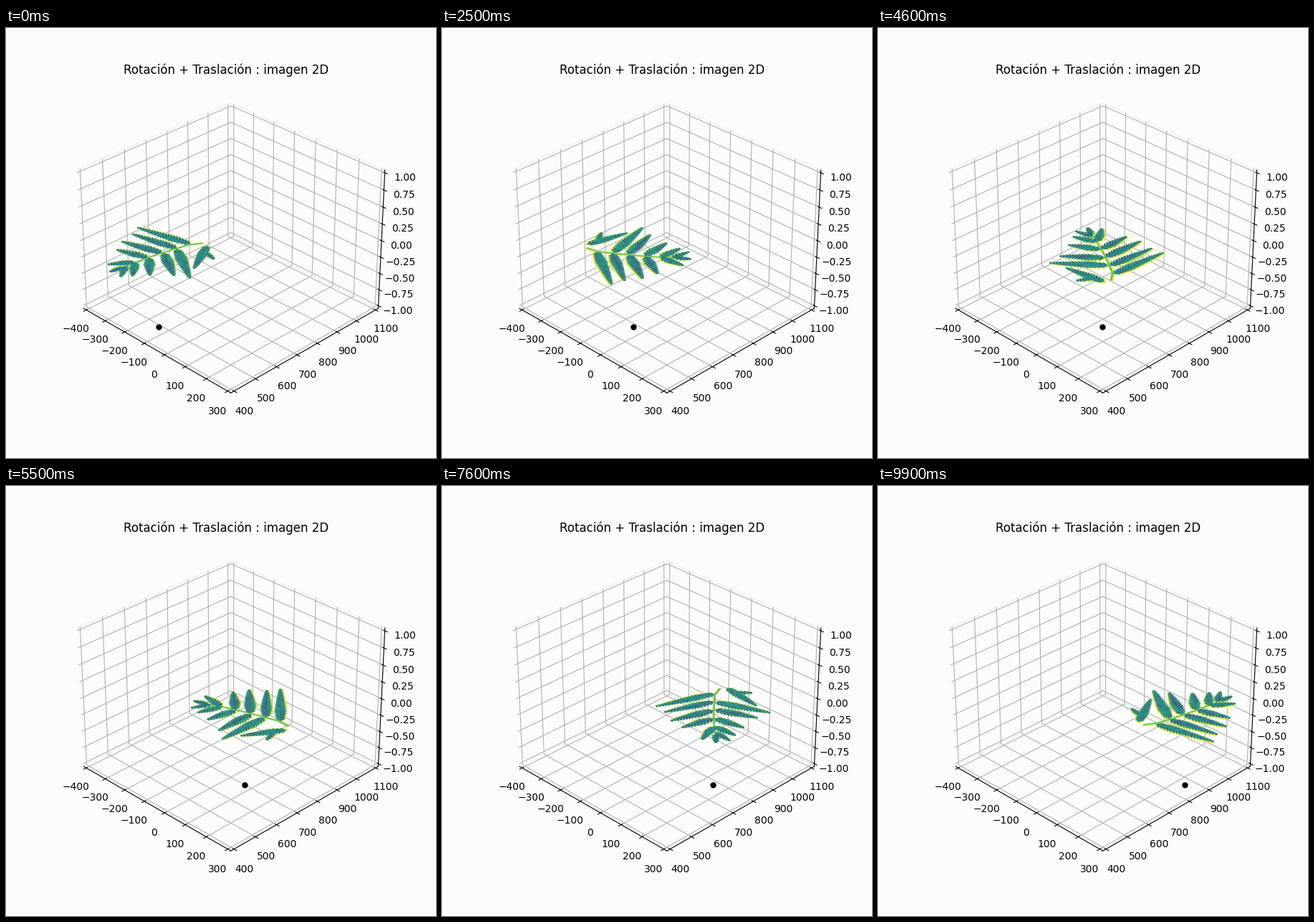
A matplotlib script for the animation above (10 s loop, 600 by 600 pixels).

```python
import numpy as np
import matplotlib.pyplot as plt
from matplotlib.animation import FuncAnimation
from mpl_toolkits.mplot3d.art3d import Poly3DCollection

FRAMES = 100
PAPER = "#fcfcfc"
UNIT = 2.42                               # data units per leaf unit
LEAF_START = np.array([-155.0, 510.0])
DOT_START = np.array([-128.5, 479.0])
TRAVEL = 373.5                            # shift along both axes
TURN = 3 * np.pi
SHADE_DIR = np.array([0.37, 0.93])        # side of the leaf with the yellow rim

# main stem of the frond, from its base to the apex
STEM = np.array([(61, 32), (42, 28), (23, 16), (5, 5), (-14, -8),
                 (-33, -22), (-48, -34), (-62, -47)], float)

# base, tip and half width of each branch
BRANCHES = [
    ((44, 30), (-33, 77), 9.5),
    ((25, 18), (-39, 58), 9.5),
    ((5, 5), (-53, 37), 10),
    ((-14, -8), (-59, 14), 9.5),
    ((-32, -20), (-69, -26), 8),
    ((25, 16), (45, -63), 10.5),
    ((7, 5), (23, -56), 10.5),
    ((-13, -8), (-10, -55), 9.5),
    ((-31, -20), (-34, -57), 8),
    ((-43, -30), (-50, -59), 6),
    ((-46, -33), (-65, -46), 6),
    ((68, 25), (50, -37), 9),
    ((66, 6), (77, -12), 5),
]


def rotation(angle):
    c, s = np.cos(angle), np.sin(angle)
    return np.array([[c, -s], [s, c]])


def lens(p, q, half):
    """Pointed oval from p to q."""
    p, q = np.asarray(p, float), np.asarray(q, float)
    axis = q - p
    normal = np.array([-axis[1], axis[0]]) / np.hypot(*axis)
    t = np.array([0, 0.2, 0.5, 0.8, 1])[:, None]
    bulge = np.array([0.3, 0.85, 1, 0.6, 0])[:, None] * half * normal
    middle = p + t * axis
    return np.vstack([middle + bulge, (middle - bulge)[::-1]])


def branch(base, tip, width):
    base, tip = np.array(base, float), np.array(tip, float)
    axis = tip - base
    length = np.hypot(*axis)
    heading = axis / length
    shapes = [lens(base, tip, 1.2)]
    count = int(length / 4.6)
    for k in range(count):
        s = (k + 0.6) / count
        reach = width * (1 - s) ** 0.7 * min(1, 0.5 + 2 * s) + 1
        root = base + s * axis
        for side in (-1, 1):
            out = rotation(side * np.radians(50)) @ heading
            shapes.append(lens(root, root + 1.25 * reach * out, 1.6))
    return shapes


def ribbon(points, wide, narrow):
    slope = np.gradient(points, axis=0)
    normal = np.column_stack([-slope[:, 1], slope[:, 0]])
    normal /= np.hypot(*normal.T)[:, None]
    normal *= np.linspace(wide, narrow, len(points))[:, None]
    return np.vstack([points + normal, (points - normal)[::-1]])


leaflets = [shape for spec in BRANCHES for shape in branch(*spec)]
outline = [ribbon(STEM, 1.1, 0.7)] + leaflets


def place(shapes, angle, centre, shift=(0, 0)):
    """Turn the flat shapes and lay them on the plane z = 0."""
    to_axes = np.array([[1, -1], [1, 1]]) / np.sqrt(2) * UNIT
    matrix = to_axes @ rotation(angle)
    placed = []
    for shape in shapes:
        xy = (shape + shift) @ matrix.T + centre
        placed.append(np.column_stack([xy, np.zeros(len(xy))]))
    return placed


fig = plt.figure(figsize=(6, 6), dpi=100, facecolor=PAPER)
ax = fig.add_subplot(projection="3d", computed_zorder=False)
ax.set_facecolor(PAPER)
ax.view_init(elev=30, azim=-45)
ax.set_title("Rotación + Traslación : imagen 2D")

for axis in (ax.xaxis, ax.yaxis, ax.zaxis):
    axis.set_pane_color((0.988, 0.988, 0.988, 1))
    axis.pane.set_edgecolor("#f1f1f1")


def add_layer(shapes, face, edge, width, order):
    layer = Poly3DCollection(place(shapes, 0, LEAF_START), facecolors=face,
                             edgecolors=edge, linewidths=width,
                             joinstyle="round", zorder=order)
    ax.add_collection3d(layer)
    return layer


rng = np.random.default_rng(4)
tones = plt.cm.viridis(rng.uniform(0.28, 0.5, len(leaflets)))
rim = add_layer(outline, "#e6e41c", "#e6e41c", 0.8, 2)
border = add_layer(outline, "#6cc660", "#6cc660", 0.6, 3)
blades = add_layer(leaflets, tones, tones, 0.15, 4)
dot, = ax.plot([0], [500], [-1], "o", color="black", ms=6, mew=0, zorder=5)


def set_limits(setter, low, high):
    margin = (high - low) / 48
    setter(low - margin, high + margin)


set_limits(ax.set_xlim, -400, 300)
set_limits(ax.set_ylim, 400, 1100)
set_limits(ax.set_zlim, -1, 1)
ax.set_xticks(np.arange(-400, 301, 100))
ax.set_yticks(np.arange(400, 1101, 100))
ax.set_zticks(np.linspace(-1, 1, 9))


def update(i):
    t = i / (FRAMES - 1)
    angle = TURN * t
    centre = LEAF_START + TRAVEL * t
    # the rim shows more when it faces the viewer
    away = (rotation(angle) @ SHADE_DIR)[1]
    rim.set_verts(place(outline, angle, centre, SHADE_DIR * (1.5 - 0.9 * away)))
    border.set_verts(place(outline, angle, centre))
    blades.set_verts(place(leaflets, angle, centre))
    x, y = DOT_START + TRAVEL * t
    dot.set_data_3d([x], [y], [-1])
    return rim, border, blades, dot


anim = FuncAnimation(fig, update, frames=FRAMES, interval=100, repeat=True)
plt.show()
```
